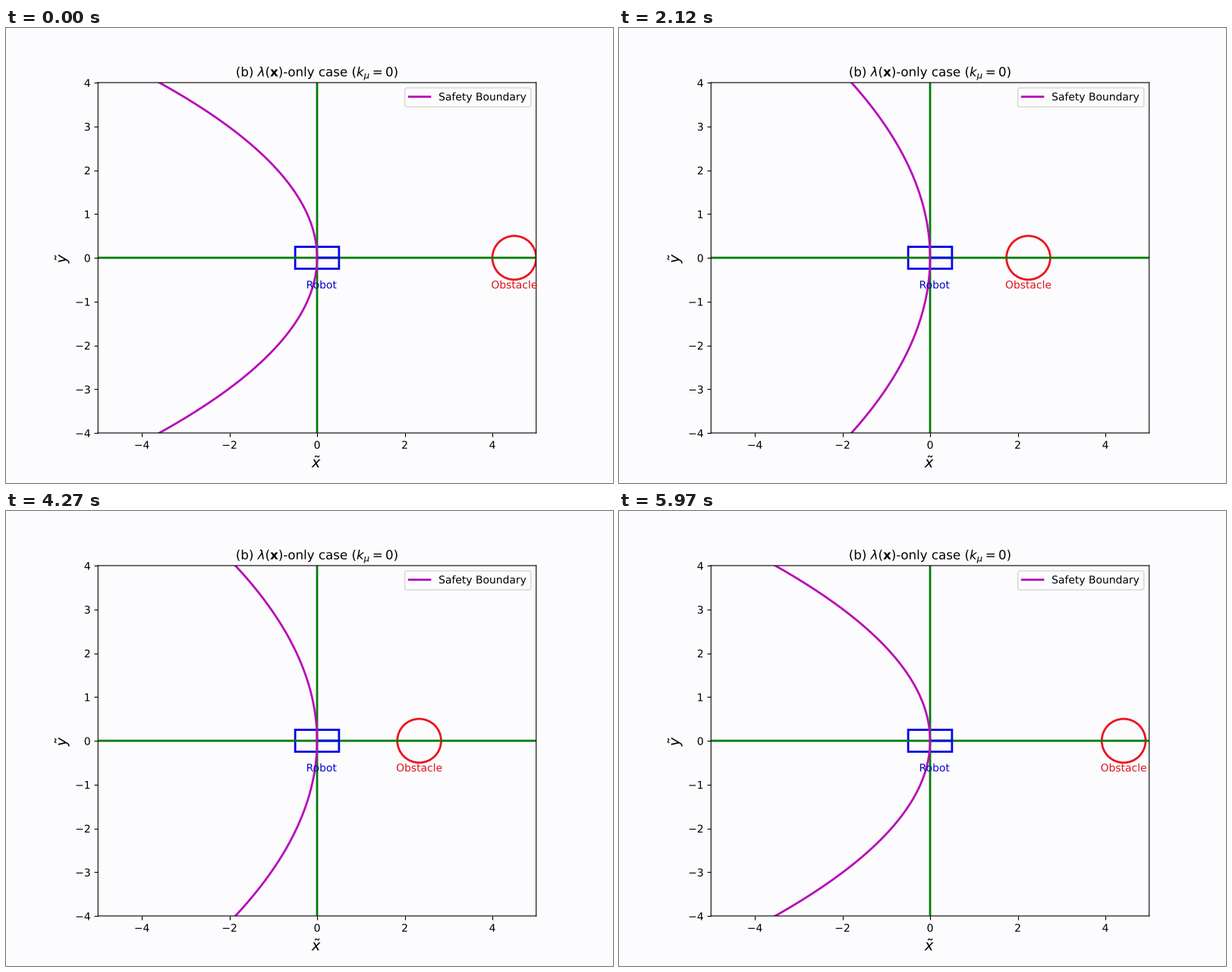
These frames come from a looping animation (800 px wide and 600 px high, 6000 ms). A matplotlib script:

```python
import numpy as np
import matplotlib.pyplot as plt
from matplotlib.animation import FuncAnimation
from matplotlib.patches import Circle, Rectangle
from matplotlib.patheffects import Normal

# Subpixel placement: no line snapping, text drawn as unhinted outlines.
plt.rcParams.update({
    "font.family": "DejaVu Sans",
    "path.snap": False,
    "path.effects": [Normal()],
})

TICKS, INTERVAL = 200, 30
PAPER, RED, BLUE = "#fcfcfe", "#ec141c", "#0404e8"
GREEN, PURPLE = "#047c08", "#b80cb8"


def obstacle_x(i):
    """Distance of the obstacle: 20 Hz poses carried by a 30 fps clip."""
    clip = i * INTERVAL * 30 // 1000
    pose = (4 * clip + 3) // 6
    return 3 + 1.5 * np.cos(0.05 * pose)


fig, ax = plt.subplots(figsize=(8, 6), dpi=100, facecolor=PAPER)
ax.set_facecolor(PAPER)
ax.set_aspect("equal")
ax.set_xlim(-5, 5)
ax.set_ylim(-4, 4)
ax.set_xlabel(r"$\tilde{x}$", fontsize=14)
ax.set_ylabel(r"$\tilde{y}$", fontsize=14)
ax.set_title(r"(b) $\lambda(\mathbf{x})$-only case ($k_{\mu}=0$)")

ax.axhline(0, color=GREEN, lw=2)
ax.axvline(0, color=GREEN, lw=2)

ax.add_patch(Rectangle((-0.5, -0.25), 1, 0.5, fill=False, ec=BLUE, lw=2))
ax.plot([0, 0.5], [0, 0], color=BLUE, lw=2)
ax.text(0.1, -0.7, "Robot", color="#0808c8", ha="center")

obstacle = ax.add_patch(Circle((4.5, 0), 0.5, fill=False, ec=RED, lw=2))
label = ax.text(4.5, -0.7, "Obstacle", color="#dc141c", ha="center")

y = np.linspace(-5, 5, 201)
boundary, = ax.plot(-0.225 * y**2, y, color=PURPLE, lw=2,
                    label="Safety Boundary")
ax.legend(loc="upper right", facecolor=PAPER)


def update(i):
    x = obstacle_x(i)
    obstacle.center = (x, 0)
    label.set_x(x)
    boundary.set_xdata(-0.05 * x * y**2)
    return obstacle, label, boundary


anim = FuncAnimation(fig, update, frames=TICKS, interval=INTERVAL,
                     repeat=True, repeat_delay=0)
plt.show()
```
